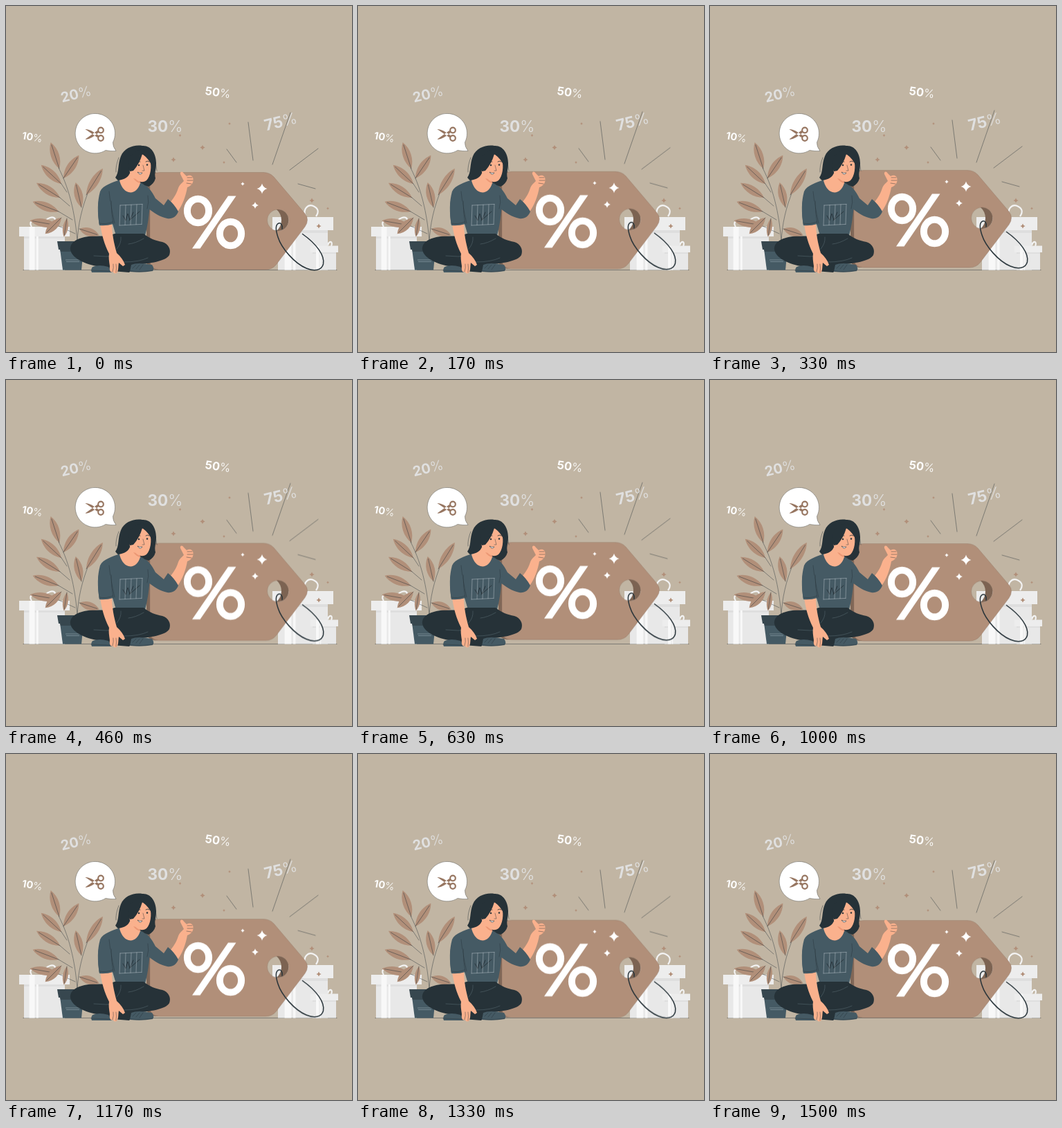
Animation, 500 px wide and 500 px high, one loop 1.54 s. Source, as an HTML page:

```html
<!DOCTYPE html>
<html lang="en">
<head>
<meta charset="utf-8">
<title>Discount tag</title>
<style>
html, body { margin: 0; width: 100%; height: 100%; overflow: hidden; background: #c1b5a3; }
svg { display: block; width: 100vw; height: 100vh; }
text { font-family: Inter, "Open Sans", sans-serif; font-weight: 700; }
tspan { font-weight: 300; }
.line { fill: none; stroke: #263238; stroke-width: .45; stroke-linecap: round; stroke-linejoin: round; }
.bow { fill: none; stroke: #f3f3f3; stroke-width: 2.2; }
.skin { fill: #fab18d; }
.dark { fill: #263238; }
.shirt { fill: #455a64; }
.brown { fill: #b18f79; }
.white { fill: #fff; }
</style>
</head>
<body>
<svg viewBox="0 0 500 500">
  <path class="line" d="M25 381.5H478"/>

  <path class="bow" d="M37 319C31 310 42 307 53 319C55 305 73 301 71 311Q69 317 54 319M433 304C428 293 437 286 444 289Q455 294 448 304M460 347C458 338 465 338 465 346C467 338 473 340 470 347"/>
  <g id="boxes"></g>

  <g id="plant"></g>
  <path class="shirt" d="M78 351H112L109 381.5H82z"/>
  <path fill="#37474f" d="M74 340H115V352H112L111 355H79L78 352H76z"/>
  <path d="M86 367H107M87 369.5H106" stroke="#90a4ae" stroke-width=".6"/>

  <g id="glints" class="brown"></g>

  <!-- speech bubble -->
  <path class="white" stroke="#5b5a57" stroke-width=".5" d="M144 208.500A28.700 28.700 0 1 1 154.500 197Q154 203 159 209.500Q151 210 144 208.500z"/>
  <g fill="none" stroke="#977661" stroke-width="2.2">
    <circle cx="137" cy="179.5" r="3.800"/>
    <circle cx="137" cy="191" r="3.800"/>
  </g>
  <path fill="#977661" d="M114.500 178Q121 177 135 188L132 190zM114.500 192.500Q121 194 135 182L132 180z"/>

  <g id="tag">
    <path class="line" d="M319 207L333 226M350 168L357 223M411 154L385 229M410 237L451 206M422 257L447 264"/>
    <path fill="#806757" d="M203 252Q204 240 217 240.500L220 381H216Q205 381 203 370z"/>
    <path class="brown" fill-rule="evenodd" stroke="#8f7361" stroke-width=".4" d="M222 240.500H372Q381 240.500 387 247L432 300Q439 309 432 319L391 373Q385 381 375 381H222Q208 381 208 367V255Q208 240.500 222 240.500z
      M377.500 309.500a15.500 15.500 0 1 0 31 0a15.500 15.500 0 1 0 -31 0z"/>
    <path fill="#7c6352" d="M391 294A15.600 15.600 0 1 1 391 325A20.600 20.600 0 0 0 391 294z"/>
    <g fill="none" stroke="#fff" stroke-width="10">
      <ellipse cx="277.500" cy="296" rx="15.600" ry="17.300"/>
      <ellipse cx="324.500" cy="329" rx="15.600" ry="17.300"/>
    </g>
    <path class="white" d="M269 350.500L321 274.500H332.500L280.500 350.500z"/>
    <g id="shine" class="white"></g>
    <path class="line" style="stroke-width:1.5" d="M399 322C400 316 397 313 394 314C389 316 390 325 393 334C398 350 417 372 434 379C446 384 456 382 458.500 373C461 361 449 344 428.500 329.500"/>
  </g>

  <g id="labels"></g>

  <!-- woman -->
  <g>
    <!-- raised arm -->
    <path class="skin" d="M228 292C239 284 246 273 249 263C251 258 254 256 257 253L252 243C251 239 255 238 257 242L261 246C266 243 271 246 270.500 251C271 256 267 260 262 262C260 274 255 288 248 297L238 301z"/>
    <path class="line" d="M262 248H269M262 252H270M261 256L268 257"/>
    <path class="shirt" d="M193 256C204 257 211 268 216 278L228 288L234 279Q243 286 249 297C246 305 240 308 233 307C223 305 213 299 204 291z"/>
    <!-- hair behind -->
    <path class="dark" d="M158 248C164 240 161 229 166 217C171 205 185 200 197 202C209 201 217 213 217 227C217 237 214 242 216 249Q214 257 206 261L180 253Q166 259 158 248z"/>
    <!-- torso -->
    <path class="shirt" d="M165 251C154 255 140 259 136 268C132 282 132 299 135 317L154 315L159 332H201C205 317 207 300 208 286C209 270 204 258 193 255z"/>
    <path class="skin" d="M164 252C170 250 177 249 180 239L194 245Q191 251 194 256C191 266 184 271 177 269C170 267 166 260 164 252z"/>
    <path fill="#eb9774" d="M184 249Q189 256 195 256L191 251z"/>
    <!-- face -->
    <path class="skin" d="M186 219C192 212 202 213 208 221C211 232 209 246 203 252C196 257 187 253 184 244C179 243 177 237 180 235Q183 234 184 237z"/>
    <path class="dark" d="M179 239C172 224 182 210 193 208C205 206 213 216 211 232Q207 221 197 214Q193 228 184 238z"/>
    <path class="line" style="stroke-width:.8" d="M188 226Q191 223 194 225M202 225Q205 223 207 225"/>
    <circle class="dark" cx="192" cy="230" r="1.200"/>
    <circle class="dark" cx="204" cy="229.500" r="1.200"/>
    <path class="line" d="M198 230L200 238H197M211 215C217 222 216 231 218 238M163 219Q158 232 159 240"/>
    <path class="white" stroke="#263238" stroke-width=".6" d="M190 240Q193 242 197 241Q194 246 190 240z"/>
    <path class="line" d="M149 268Q151 288 157 314M205 274Q207 284 204 293M151 326Q146 322 142 317"/>
    <!-- shirt print -->
    <g id="print" class="line" style="stroke:#c4cfd4">
      <path class="line" style="stroke-width:.9" d="M169 303L173 310L176 300L179 309L184 298M178 310L193 297"/>
    </g>
    <!-- legs -->
    <path class="dark" d="M157 329H199C207 336 216 339 226 341C235 344 239 352 236 360C231 369 207 372 188 374L178 385L153 383L139 377C119 375 95 366 93 352C92 342 103 335 119 333C134 332 146 334 157 329z"/>
    <path class="line" style="stroke:#64767e" d="M166 334Q167 343 160 351M199 336Q187 343 177 344M127 361Q145 363 162 361M171 370Q192 370 205 364"/>
    <!-- shoes -->
    <path class="shirt" d="M125 377Q134 373 148 377L153 385H124Q122 381 125 377zM181 374Q190 370 211 374Q215 379 212 383Q196 386 179 384z"/>
    <path class="line" d="M123 382L150 383M183 379L188 374M188 380L193 374M193 381L198 374M180 383Q198 385 212 382"/>
    <!-- resting arm -->
    <path class="skin" d="M136 314L153 313C153 328 156 343 160 357C166 362 170 368 172 374L169 376L163 371C162 377 163 382 160 386C157 387 155 386 155 384C151 386 149 382 150 376C149 369 148 363 149 358C142 344 138 330 136 314z"/>
    <path class="line" d="M154 384Q156 378 155 373M159 385Q160 378 159 373"/>
    <path class="shirt" d="M137 269C132 282 132 299 135 317Q145 318 155 315L151 283z"/>
    <path class="line" d="M152 282Q152 299 155 315M135 314Q145 316 154 312"/>
  </g>
</svg>
<script>
const $ = id => document.getElementById(id);
const add = (id, html) => $(id).insertAdjacentHTML('beforeend', html);
const line = (id, d) => add(id, `<path class="line" d="${d}"/>`);
const FLOOR = 381.5;

// Gift box: lid overhangs the body by `edge`, two ribbons run down the front
function box(x, y, w, lid, edge) {
  const rect = (dx, dy, wide, high, fill) =>
    add('boxes', `<rect x="${x + dx}" y="${y + dy}" width="${wide}" height="${high}" fill="${fill}"/>`);
  const high = FLOOR - y;
  rect(edge, lid, w - 2 * edge, high - lid, '#e8e8e8');
  rect(0, 0, w, lid, '#ededed');
  rect(edge, lid, w - 2 * edge, lid / 5, '#dedede');
  rect(w * .2, 0, w * .11, high, '#f8f8f8');
  rect(w * .34, lid, w * .04, high - lid, '#f8f8f8');
}
box(19, 319, 73, 14, 7);
box(385, 305, 88, 19, 8);
box(440, 346.5, 40, 9.5, 3);

// Leaf drawn along x, then placed at its base and turned
function leaf(x, y, turn, len = 40, w = 8) {
  add('plant', `<g transform="translate(${x} ${y}) rotate(${turn})">
    <path fill="#b18f79" d="M0 0C${len * .3} ${w} ${len * .7} ${w} ${len} 0C${len * .7} ${-w} ${len * .3} ${-w} 0 0z"/>
    <path class="line" d="M0 0H${len * .9}"/></g>`);
}
line('plant', 'M103 341C101 310 94 268 76 234M103 341C104 315 110 290 120 266');
for (let i = 0; i < 4; i++) {
  const x = 80 - 2 * i, y = 257 + 20 * i;
  leaf(x, y, 223 - 11 * i);
  line('plant', `M${x} ${y}L${88 + 4 * i} ${y + 12}`);
}
leaf(77, 235, 252);
leaf(83, 249, 304);
leaf(116, 273, 302, 45);
leaf(109, 291, 257, 37);
leaf(106, 322, 18, 30);
leaf(80, 306, 135, 33);
leaf(88, 307, 99, 27, 5);

// Bars inside the shirt print frame
for (let i = 0; i < 5; i++) {
  const x = 165 + 8 * i;
  line('print', `M${x} ${288 - i * .4}l-1 29`);
}
line('print', 'M165 288L197 286.4M164 317L196 315.4');
$('print').querySelectorAll('path').forEach(p => p.style.stroke = '#c4cfd4');
$('print').firstElementChild.style.stroke = '#263238';

function label(num, x, y, size, turn, fill = '#e0e0e0') {
  add('labels', `<text transform="translate(${x} ${y}) rotate(${turn})" font-size="${size}" fill="${fill}">${num}<tspan>%</tspan></text>`);
}
label(20, 81, 139.5, 20, -14);
label(10, 22.5, 192, 14.5, 10, '#fff');
label(50, 287, 128, 16.5, 8, '#fff');
label(30, 204.5, 181.5, 22.5, 0);
label(75, 375.5, 180.5, 22.5, -14);

// Four-pointed star
function star(id, x, y, r) {
  const q = r * .2;
  add(id, `<path transform="translate(${x} ${y})" d="M0 ${-r}Q${q} ${-q} ${r} 0Q${q} ${q} 0 ${r}Q${-q} ${q} ${-r} 0Q${-q} ${-q} 0 ${-r}z"/>`);
}
// Large and small glints alternate
[[242, 222], [251.5, 187], [284, 204.5], [323, 170], [452, 318], [315, 226], [442, 281], [465, 292.5]]
  .forEach(([x, y], i) => star('glints', x, y, i % 2 ? 1.9 : 3.6));
star('shine', 370, 264, 7.5);
star('shine', 360, 288, 5);
star('shine', 342, 257, 2.8);

// The tag floats up and down once per loop
const LOOP = 1540;
$('tag').animate(
  { transform: ['translateY(.1px)', 'translateY(-5.9px)'] },
  { duration: LOOP / 2, delay: -70, iterations: Infinity, direction: 'alternate', easing: 'linear' }
).effect.updateTiming({ easing: 'linear' });
$('tag').getAnimations()[0].effect.setKeyframes([
  { transform: 'translateY(.1px)', easing: 'cubic-bezier(.37, 0, .63, 1)' },
  { transform: 'translateY(-5.9px)' }
]);
</script>
</body>
</html>
```
